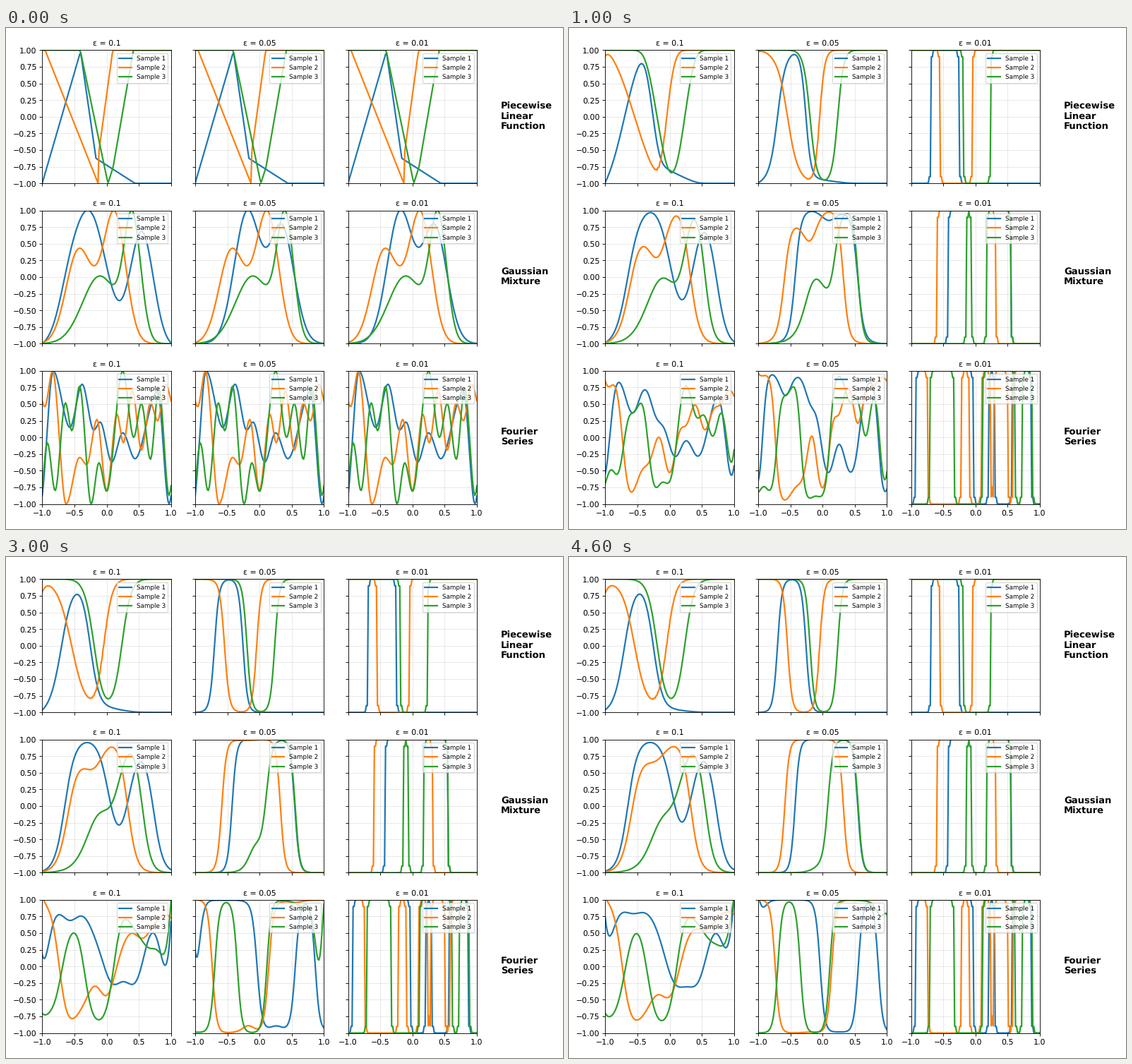
Write a matplotlib script that moves like this. It is 789 px wide and 710 px high and loops after 5 s.

```python
import numpy as np
import matplotlib.pyplot as plt
from matplotlib.animation import FuncAnimation

W, H, DPI = 789, 710, 78.9
EPS = [0.1, 0.05, 0.01]
ROWS = ["Piecewise\nLinear\nFunction", "Gaussian\nMixture", "Fourier\nSeries"]
SNAPSHOTS, STEPS, T_END = 5, 50, 0.01

plt.rcParams["text.hinting"] = "none"
x = np.linspace(-1, 1, 128)


def linear(*corners):
    return np.interp(x, *zip(*corners))


def mixture(*terms, base=0.0):
    """Sum of (amplitude, centre, width) bells, mapped from 0..1 to -1..1."""
    g = sum(a * np.exp(-0.5 * ((x - c) / s) ** 2) for a, c, s in terms)
    return np.clip(2 * (g + base) - 1, -1, 1)


def wave(*turns):
    """Smooth wave of period 2 through its turning points."""
    p = np.array(turns)
    p = np.vstack([p - [2, 0], p, p + [2, 0]])
    i = np.searchsorted(p[:, 0], x, side="right") - 1
    (x0, y0), (x1, y1) = p[i].T, p[i + 1].T
    t = (x - x0) / (x1 - x0)
    return y0 + (y1 - y0) * t * t * (3 - 2 * t)


pieces = [
    linear((-1, -1), (-0.405, 0.98), (-0.165, -0.625), (0.44, -1)),
    linear((-0.955, 1), (-0.133, -1), (-0.12, -0.52), (0.095, 1)),
    linear((-0.41, 1), (0.02, -1), (0.1, -0.76), (0.415, 1)),
]
bells = [
    mixture((0.987, -0.19, 0.2), (0.87, 0.345, 0.19)),
    mixture((0.69, -0.44, 0.19), (0.126, -0.15, 0.15), (0.966, 0.125, 0.17)),
    mixture((0.508, -0.105, 0.27), (0.91, 0.4, 0.13)),
]
wide_bell = mixture((1.016, -0.275, 0.27), (0.152, -0.6, 0.15),
                    (0.864, 0.545, 0.18), base=-0.03)
waves = [
    wave((-0.83, 1), (-0.57, 0.15), (-0.38, 0.8), (-0.2, 0.11), (-0.1, 0.23),
         (0.08, -0.37), (0.25, 0.07), (0.44, -0.32), (0.79, 0.7), (0.97, -1)),
    wave((-0.96, 0.46), (-0.84, 1), (-0.63, -1), (-0.42, -0.3), (-0.31, -0.41),
         (-0.15, 0.27), (0, -0.8), (0.16, 0.35), (0.26, -0.08), (0.4, 0.7),
         (0.54, -0.19), (0.68, 0.52), (0.79, 0.25), (0.92, 0.8)),
    wave((-0.92, -0.08), (-0.8, -0.8), (-0.64, 0.52), (-0.54, 0.1), (-0.42, 0.77),
         (-0.24, -1), (-0.12, -0.38), (0, -0.81), (0.25, 1), (0.42, 0),
         (0.54, 0.51), (0.68, -0.33), (0.81, 0.75), (0.97, -0.87)),
]

# Axes of u: row, column, sample, x
u = np.array([[family] * 3 for family in (pieces, bells, waves)])
u[1, 0, 0] = wide_bell
stiff = 1 / np.array(EPS)[None, :, None, None] ** 2


def slope(v):
    return np.gradient(v, x[1] - x[0], axis=-1, edge_order=2)


def rate(v):
    """Allen-Cahn: u_t = u_xx - (u^3 - u) / eps^2."""
    return slope(slope(v)) - stiff * (v ** 3 - v)


def advance(v, dt):
    k1 = rate(v)
    k2 = rate(v + dt / 2 * k1)
    k3 = rate(v + dt / 2 * k2)
    k4 = rate(v + dt * k3)
    return v + dt / 6 * (k1 + 2 * k2 + 2 * k3 + k4)


history = [u]
dt = T_END / ((SNAPSHOTS - 1) * STEPS)
for _ in range(SNAPSHOTS - 1):
    for _ in range(STEPS):
        u = advance(u, dt)
    history.append(u)

fig = plt.figure(figsize=(10, 9), dpi=DPI, facecolor="white")
AX_W, AX_H = 182.5, 188.7
lines = []
for r, label in enumerate(ROWS):
    top = 31.5 + 227.2 * r
    for c, eps in enumerate(EPS):
        left = 51.3 + 216.6 * c
        ax = fig.add_axes([left / W, 1 - (top + AX_H) / H, AX_W / W, AX_H / H])
        ax.set(xlim=(-1, 1), ylim=(-1, 1),
               xticks=np.linspace(-1, 1, 5), yticks=np.linspace(-1, 1, 9))
        ax.tick_params(labelleft=c == 0, labelbottom=r == 2)
        ax.grid(True, alpha=0.3)
        ax.set_title(f"ε = {eps}", fontsize=10)
        for s in range(3):
            line, = ax.plot(x, history[0][r, c, s], lw=2, label=f"Sample {s + 1}")
            lines.append((line, (r, c, s)))
        ax.legend(loc="upper right", fontsize=8)
    fig.text(701 / W, 1 - (top + AX_H / 2) / H, label,
             fontsize=12, fontweight="bold", ha="left", va="center")


def update(i):
    for line, key in lines:
        line.set_ydata(history[i][key])
    return [line for line, _ in lines]


anim = FuncAnimation(fig, update, frames=SNAPSHOTS, interval=1000,
                     repeat=True, repeat_delay=0, blit=False)
plt.show()
```
